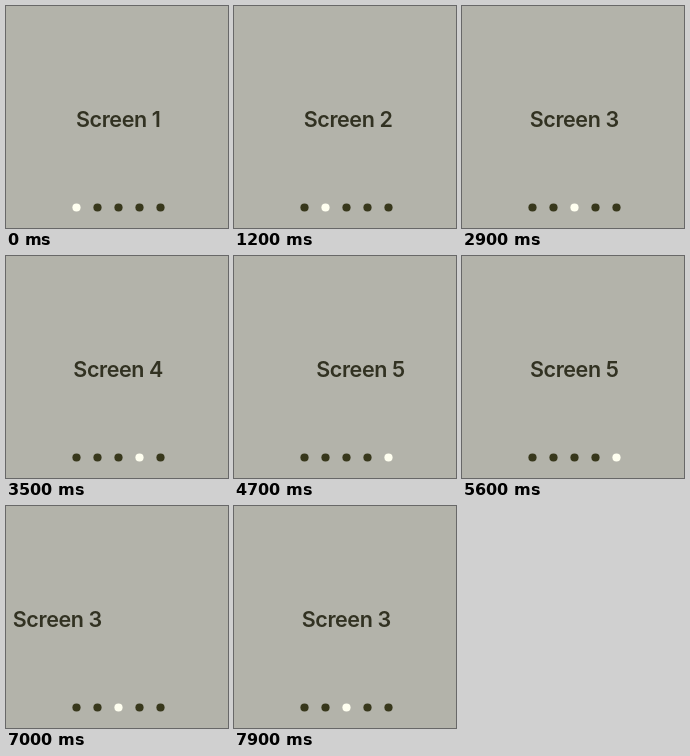
Recreate the animation shown at these times as an HTML page. Size 222x222 px, loop 8 s.

```html
<!DOCTYPE html>
<html lang="en">
<head>
<meta charset="utf-8">
<title>Paged screens</title>
<style>
  html, body { margin: 0; width: 100%; height: 100%; overflow: hidden; background: #b3b3aa; }
  svg { display: block; width: 100%; height: 100%; }
  text { font: 600 21.5px Inter, Roboto, sans-serif; letter-spacing: -0.4px; text-anchor: middle; fill: #323222; }
</style>
</head>
<body>
<svg viewBox="0 0 222 222"><g id="pages"></g><g id="dots"></g></svg>
<script>
const LOOP = 8000, PAGE_WIDTH = 225, SWIPE_TIME = 450, PAGE_COUNT = 5;
const swipes = [
  { start: 850, step: 1 },
  { start: 1879, step: 1 },
  { start: 2950, step: 1 },
  { start: 4400, step: 1 },
  { start: 5744, step: -1 },
  { start: 6750, step: -1 }
];

function add(parent, tag, attributes) {
  const node = document.createElementNS('http://www.w3.org/2000/svg', tag);
  for (const name in attributes) node.setAttribute(name, attributes[name]);
  return parent.appendChild(node);
}

const pages = document.getElementById('pages');
const dotGroup = document.getElementById('dots');
const dots = [];
for (let i = 0; i < PAGE_COUNT; i++) {
  add(pages, 'text', { x: 112.2 + i * PAGE_WIDTH, y: 121 }).textContent = `Screen ${i + 1}`;
  dots.push(add(dotGroup, 'circle', { cx: 70.5 + i * 21, cy: 201.5, r: 4.1 }));
}

function ease(p) {
  return p < 0.5 ? 16 * p ** 5 : 1 - 16 * (1 - p) ** 5;
}

function render(time) {
  let position = 0, active = 0;
  for (const { start, step } of swipes) {
    const p = ease(Math.min(1, Math.max(0, (time - start) / SWIPE_TIME)));
    position += step * p;
    if (p > 0.4) active += step;
  }
  pages.setAttribute('transform', `translate(${-position * PAGE_WIDTH} 0)`);
  dots.forEach((dot, i) => dot.setAttribute('fill', i === active ? '#fffff0' : '#38381c'));
}

const origin = performance.now();
function tick() {
  render((performance.now() - origin) % LOOP);
  requestAnimationFrame(tick);
}
tick();
</script>
</body>
</html>
```
